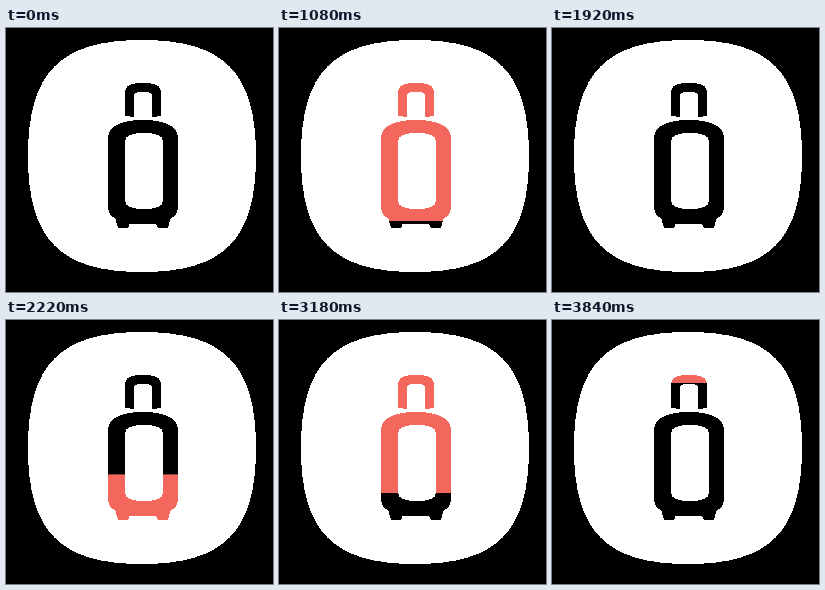
Animation of 267x264 px, one loop 3.9 s. Source, as an HTML page:

```html
<!DOCTYPE html>
<html lang="en">
<head>
<meta charset="utf-8">
<title>Suitcase</title>
<style>
  html, body { margin: 0; width: 100%; height: 100%; overflow: hidden; background: #000; }
  svg { display: block; width: 267px; height: 264px; shape-rendering: crispEdges; }

  /* One coral strip rises over the icon: its top edge fills, its bottom edge clears. */
  .strip {
    fill: #f4675c;
    animation: rise 3900ms -2ms infinite;
  }
  @keyframes rise {
    0%       { transform: translateY(202.65px); animation-timing-function: steps(16, end); }
    24.6154% { transform: translateY(48.25px);  animation-timing-function: step-end; }
    26.1538% { transform: translateY(48px);     animation-timing-function: steps(15, end); }
    49.2307% { transform: translateY(-102px);   animation-timing-function: step-end; }
    49.2308% { transform: translateY(202.65px); animation-timing-function: steps(16, end); }
    73.8462% { transform: translateY(48.25px);  animation-timing-function: step-end; }
    76.9231% { transform: translateY(48px);     animation-timing-function: steps(15, end); }
    100%     { transform: translateY(-102px); }
  }
</style>
</head>
<body>
<svg viewBox="0 0 267 264">
  <defs>
    <mask id="case" maskUnits="userSpaceOnUse" x="0" y="0" width="267" height="264">
      <g fill="#fff">
        <!-- handle -->
        <path d="M119 88V65C119 58 123 55 137 55S155 58 155 65V88L146 89V67C146 65 144 64 137 64S128 65 128 67V89Z"/>
        <!-- body with its window -->
        <path fill-rule="evenodd" d="M102 111C102 99 113 92 137 92S172 99 172 111V178C172 185 169 189 163 191L160 196H114L111 191C105 189 102 185 102 178Z
          M119 114C119 107 126 105 138 105S157 107 157 114V172C157 179 150 181 138 181S119 179 119 172Z"/>
        <!-- feet -->
        <path d="M109 189L112 200H122L125 193ZM165 189L162 200H152L149 193Z"/>
        <path d="M111 191H163V193L161 196H113Z"/>
      </g>
    </mask>
  </defs>
  <path fill="#fff" d="M136 12C218 12 250 44.500 250 128S218 244 136 244S22 211.500 22 128S54 12 136 12Z"/>
  <g mask="url(#case)">
    <rect width="267" height="264"/>
    <rect class="strip" width="267" height="155"/>
  </g>
</svg>
</body>
</html>
```
